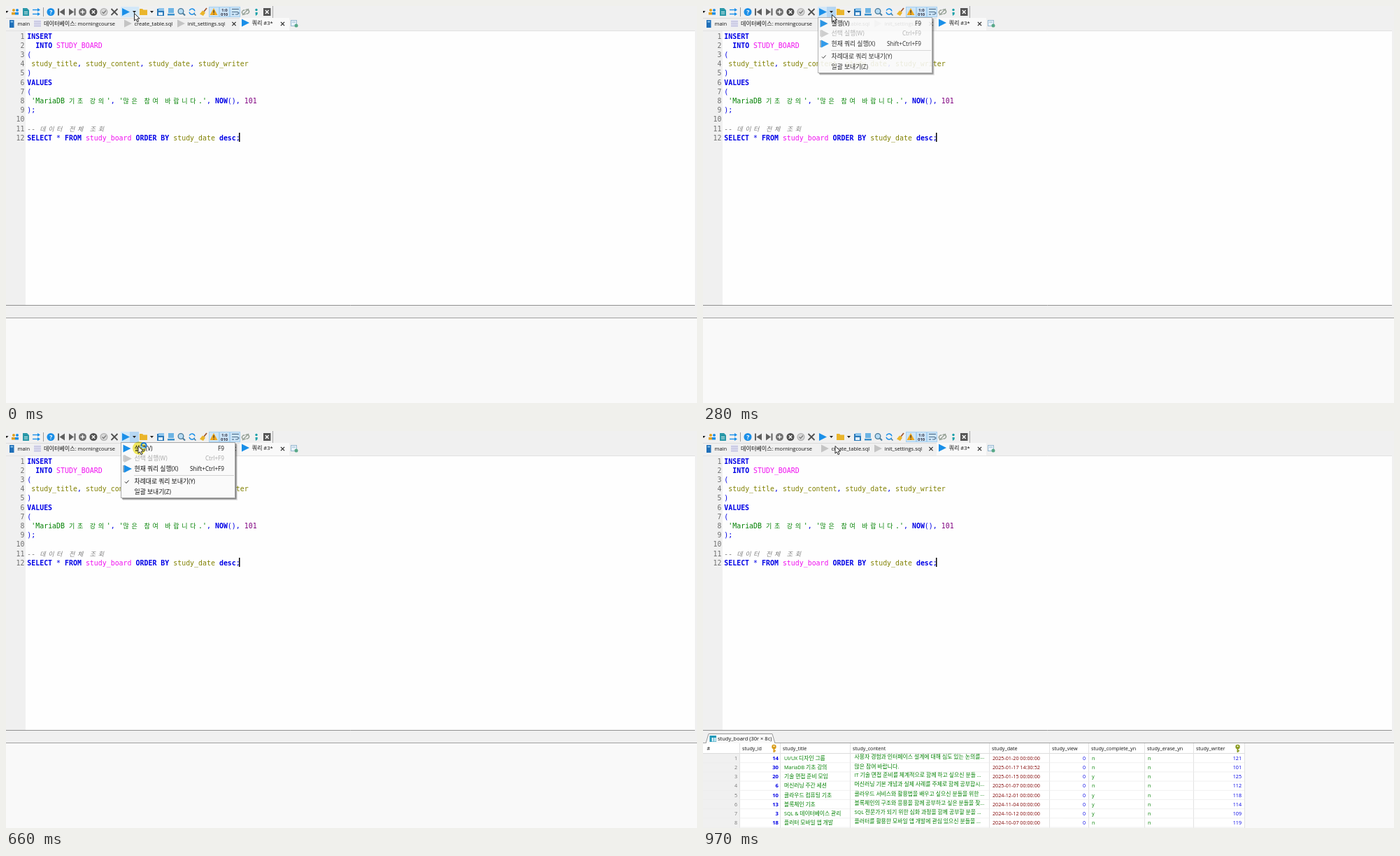
Recreate the animation shown at these times as an HTML page with a canvas. Size 988x567 px, loop 1180 ms.

```html
<!DOCTYPE html>
<html lang="ko">
<head>
<meta charset="utf-8">
<title>SQL editor</title>
<style>
html, body { margin: 0; width: 100%; height: 100%; overflow: hidden; background: #f9f9f9; }
canvas { display: block; }
</style>
</head>
<body>
<canvas id="stage" width="988" height="567"></canvas>
<script>
const W = 988, H = 567, LOOP = 1180;
const screen2d = document.getElementById('stage').getContext('2d');
const buffer = document.createElement('canvas');
buffer.width = W;
buffer.height = H;
const buffer2d = buffer.getContext('2d');
let ctx = screen2d;

const BLUE = '#1a8fe8', DARK = '#606060', GREEN = '#008000', NAVY = '#0000e6';
const UI = '"Open Sans","Noto Sans CJK KR","Noto Sans CJK",sans-serif';
const MONO = '"DejaVu Sans Mono","Noto Sans CJK KR","Noto Sans CJK",monospace';

// Drawing helpers
function rect(x, y, w, h, color) {
  ctx.fillStyle = color;
  ctx.fillRect(x, y, w, h);
}
function frame(x, y, w, h, color) {
  ctx.strokeStyle = color;
  ctx.lineWidth = 1;
  ctx.strokeRect(x + .5, y + .5, w - 1, h - 1);
}
function trace(p) {
  ctx.beginPath();
  for (let i = 0; i < p.length; i += 2) ctx.lineTo(p[i], p[i + 1]);
}
function poly(p, color) {
  trace(p);
  ctx.closePath();
  ctx.fillStyle = color;
  ctx.fill();
}
function line(p, color, width = 1) {
  trace(p);
  ctx.strokeStyle = color;
  ctx.lineWidth = width;
  ctx.stroke();
}
function disc(x, y, r, color) {
  ctx.beginPath();
  ctx.arc(x, y, r, 0, 7);
  ctx.fillStyle = color;
  ctx.fill();
}
function ring(x, y, r, color, width = 1, from = 0, to = 6.3) {
  ctx.beginPath();
  ctx.arc(x, y, r, from, to);
  ctx.strokeStyle = color;
  ctx.lineWidth = width;
  ctx.stroke();
}
function cross(x, y, r, color, width) {
  line([x - r, y - r, x + r, y + r], color, width);
  line([x - r, y + r, x + r, y - r], color, width);
}
const play = (x, y, color) => poly([x - 5, y - 5.5, x + 6, y, x - 5, y + 5.5], color);
const drop = (x, y) => poly([x - 2.5, y - 1, x + 2.5, y - 1, x, y + 2], '#222');

// Hangul is set slightly larger than Latin
function text(s, x, y, color, size = 7.5, right = false, style = '') {
  const parts = s.match(/[가-힣]+|[^가-힣]+/g).map(p => {
    const font = `${style} ${/[가-힣]/.test(p) ? size * 1.08 : size}px ${UI}`;
    ctx.font = font;
    return { p, font, w: ctx.measureText(p).width };
  });
  if (right) x -= parts.reduce((sum, q) => sum + q.w, 0);
  ctx.fillStyle = color;
  for (const q of parts) {
    ctx.font = q.font;
    ctx.fillText(q.p, x, y);
    x += q.w;
  }
}

// Draws a group off screen, then blends it as one
function fade(alpha, draw) {
  ctx = buffer2d;
  ctx.clearRect(0, 0, W, H);
  draw();
  ctx = screen2d;
  ctx.globalAlpha = alpha;
  ctx.drawImage(buffer, 0, 0);
  ctx.globalAlpha = 1;
}

function toolbar(t) {
  rect(0, 0, W, 35, '#f0f0f0');
  line([0, 17.5, 381, 17.5], '#dcdcdc');
  line([381.5, 0, 381.5, 17], '#a8a8a8');
  line([53.5, 2, 53.5, 15], '#999');
  drop(1, 8);

  disc(11, 6, 2, '#e0a020');
  disc(16, 6, 2, BLUE);
  rect(8, 9, 5, 3.5, '#e0a020');
  rect(13, 9, 5, 3.5, BLUE);

  poly([24, 3, 30, 3, 33, 6, 33, 14, 24, 14], '#2a98a8');
  rect(26, 8, 5, 1, '#d8f0f0');
  rect(26, 10.5, 5, 1, '#d8f0f0');

  for (const y of [5.5, 11.5]) line([38, y, 46, y], BLUE, 1.4);
  poly([45, 3, 49, 5.5, 45, 8], BLUE);
  poly([45, 9, 49, 11.5, 45, 14], BLUE);

  disc(64, 8.5, 5.5, BLUE);
  text('?', 62.2, 11.7, '#fff', 8.5, false, 'bold');

  rect(74, 3.5, 2, 10, DARK);
  poly([84, 3.5, 84, 13.5, 76.5, 8.5], DARK);
  rect(97.5, 3.5, 2, 10, DARK);
  poly([90, 3.5, 90, 13.5, 97, 8.5], DARK);

  disc(109.5, 8.5, 5.5, '#707070');
  line([106.5, 8.5, 112.5, 8.5], '#fff', 1.4);
  line([109.5, 5.5, 109.5, 11.5], '#fff', 1.4);
  disc(125, 8.5, 5.5, '#505050');
  cross(125, 8.5, 2.2, '#fff', 1.3);
  disc(140, 8.5, 5.5, '#b0b0b0');
  disc(140, 8.5, 4.3, '#d8d8d8');
  line([137.5, 8.5, 139.5, 10.5, 143, 6.5], '#777', 1.2);
  cross(155, 8.5, 4.5, '#505050', 1.8);

  if (t < 700) {
    rect(164, 1, 26, 15, '#d3e8f8');
    if (t >= 95) rect(177, 1, 13, 15, '#b5d6f2');
  }
  play(171, 8.5, BLUE);
  drop(183.5, 8);

  poly([191, 4, 195, 4, 196.5, 5.5, 202, 5.5, 202, 13, 191, 13], '#eab52c');
  drop(208.5, 8);

  rect(216, 4, 10, 10, '#2a78b8');
  rect(218, 3, 8, 4, '#8cc4ec');
  rect(218, 9, 6, 4, '#e4f2fc');
  rect(232, 3, 8, 7, '#6cb4e4');
  rect(231, 11, 10, 2.5, '#3a90cc');

  disc(250, 7.5, 3.6, '#b8dcf4');
  ring(250, 7.5, 3.8, '#467898', 1.3);
  line([253, 10.5, 256, 13.5], '#467898', 2);
  ring(266, 8, 4, BLUE, 1.5, .4, 3);
  ring(266, 8, 4, BLUE, 1.5, 3.5, 6.1);
  line([269, 11, 271.5, 13.5], '#467898', 1.5);

  line([287, 3, 283, 8], '#a05830', 1.8);
  poly([281, 6.5, 285, 9.5, 282, 14, 277, 11.5], '#eab52c');

  for (const x of [290, 305, 320]) {
    rect(x, 1, 15, 15, '#cce4f7');
    frame(x, 1, 15, 15, '#a6d0f0');
  }
  poly([297, 3, 302.5, 13, 291.5, 13], '#f0a81c');
  rect(296.5, 6, 1.2, 4, '#333');
  rect(296.5, 11, 1.2, 1.2, '#333');
  text('1:0', 308, 7.8, '#334', 6, false, 'bold');
  text('010', 307, 14.2, '#334', 6, false, 'bold');

  line([323, 4.5, 333, 4.5], '#50708c', 1.2);
  line([323, 8.5, 331, 8.5, 333, 10, 331, 12, 328, 12], '#50708c', 1.2);
  line([323, 12, 326, 12], '#50708c', 1.2);

  ring(340.5, 9, 3, '#909c90', 1.3, .8, 5);
  ring(344.5, 8, 3, '#909c90', 1.3, 4, 8.2);
  line([338, 13, 347, 4], '#909c90', 1.2);

  disc(358, 5.5, 1.7, '#18a0a8');
  poly([356.5, 9, 359.8, 9, 359.5, 12, 357, 14], '#18a0a8');
  rect(368, 3, 10.5, 11, '#555');
  cross(373.2, 8.5, 2.4, '#fff', 1.4);
}

function tabs() {
  rect(334, 17, 71, 18, '#f9f9f9');
  rect(5, 20, 6.5, 11, '#1f6fb8');
  rect(6.5, 21.5, 3.5, 2, '#8cc4ec');
  text('main', 16.5, 28.3, '#111');
  rect(40, 20, 10, 10, '#dcdcf0');
  for (const y of [22.5, 25.5, 28.5]) line([40, y, 50, y], '#b8b8d4', .8);
  text('데이터베이스: morningcourse', 54, 28.3, '#111');
  play(174, 25, '#c4c4c4');
  text('create_table.sql', 183.5, 28.3, '#111');
  play(250, 25, '#c4c4c4');
  text('init_settings.sql', 259.5, 28.3, '#111');
  cross(326, 25.5, 2.6, '#222', 1.1);
  play(342, 24, BLUE);
  text('쿼리 #3*', 351.5, 27.2, '#111');
  cross(395.5, 25.5, 2.6, '#222', 1.1);
  rect(407.5, 20, 8, 9, '#e8f2fa');
  frame(407, 20, 9, 9, '#98b8d0');
  line([409, 23, 414, 23], '#98b8d0');
  disc(415, 28, 2.5, '#58a888');
}

const SQL = `INSERT
  INTO STUDY_BOARD
(
 study_title, study_content, study_date, study_writer
)
VALUES
(
 'MariaDB 기초 강의', '많은 참여 바랍니다.', NOW(), 101
);

-- 데이터 전체 조회
SELECT * FROM study_board ORDER BY study_date desc;`.split('\n');
const CELL = 5.97, ROW = 13.2;
const TOKEN = /--.*|'[^']*'|\w+|\s+|[^\w\s]/g;

function look(token) {
  if (/^--/.test(token)) return ['#808080', 'italic'];
  if (/^'/.test(token)) return [GREEN, ''];
  if (/^\d/.test(token)) return ['#800080', ''];
  if (/^study_board$/i.test(token)) return ['#f010f0', ''];
  if (/^study_/.test(token)) return ['#808000', ''];
  if (/^\w/.test(token)) return [NAVY, 'bold'];
  return [NAVY, ''];
}

function code(s, x, y) {
  for (const token of s.match(TOKEN) || []) {
    const [color, style] = look(token);
    ctx.fillStyle = color;
    for (const p of token.match(/[가-힣]|[^가-힣]+/g)) {
      const wide = /[가-힣]/.test(p);
      ctx.font = `${style} ${wide ? 9 : 9.92}px ${MONO}`;
      ctx.fillText(p, x, y);
      x += (wide ? 2 : p.length) * CELL;
    }
  }
}

function editor() {
  rect(0, 35, W, 393, '#f0f0f0');
  rect(28, 36, 957, 391, '#fefefe');
  line([0, 35.5, 985, 35.5], '#e2e2e2');
  line([0, 427.5, 985, 427.5], '#909090');
  SQL.forEach((s, i) => {
    const y = 46.6 + i * ROW;
    ctx.font = `9.92px ${MONO}`;
    ctx.fillStyle = '#707070';
    ctx.textAlign = 'right';
    ctx.fillText(i + 1, 26.5, y);
    ctx.textAlign = 'left';
    code(s, 30.3, y);
  });
  rect(333, 181, 1.5, 13, '#000');
}

const EDGES = [52, 110, 210, 409, 495, 551, 631, 701, 774];
const HEADS = ['study_id', 'study_title', 'study_content', 'study_date', 'study_view',
  'study_complete_yn', 'study_erase_yn', 'study_writer'];
const DATA = [
  [14, 'UI/UX 디자인 그룹', '사용자 경험과 인터페이스 설계에 대해 심도 있는 논의를...', '2025-01-20 00:00:00', 'n', 121],
  [30, 'MariaDB 기초 강의', '많은 참여 바랍니다.', '2025-01-17 14:30:52', 'n', 101],
  [20, '기술 면접 준비 모임', 'IT 기술 면접 준비를 체계적으로 함께 하고 싶으신 분들 ...', '2025-01-15 00:00:00', 'y', 125],
  [6, '머신러닝 주간 세션', '머신러닝 기본 개념과 실제 사례를 주제로 함께 공부합시...', '2025-01-07 00:00:00', 'n', 112],
  [10, '클라우드 컴퓨팅 기초', '클라우드 서비스와 활용법을 배우고 싶으신 분들을 위한 ...', '2024-12-01 00:00:00', 'y', 118],
  [13, '블록체인 기초', '블록체인의 구조와 응용을 함께 공부하고 싶은 분들을 찾...', '2024-11-04 00:00:00', 'y', 114],
  [3, 'SQL & 데이터베이스 관리', 'SQL 전문가가 되기 위한 심화 과정을 함께 공부할 분을 ...', '2024-10-12 00:00:00', 'y', 109],
  [18, '플러터 모바일 앱 개발', '플러터를 활용한 모바일 앱 개발에 관심 있으신 분들을 ...', '2024-10-07 00:00:00', 'n', 119]
];

function key(x, color) {
  disc(x, 451, 3.2, color);
  rect(x - 1, 453, 2, 6, color);
  rect(x, 456, 2.5, 1.5, color);
  disc(x, 450.3, 1, '#fff');
}

function results() {
  poly([4, 446, 8, 432.5, 99, 432.5, 103, 446], '#f9f9f9');
  line([4, 446, 8, 432.5, 99, 432.5, 103, 446], '#999');
  rect(9.5, 435, 9.5, 9, '#2098b8');
  rect(12.5, 438, 6, 5.5, '#d8f0f8');
  line([15.5, 438, 15.5, 443.5], '#2098b8', .8);
  text('study_board (30r × 8c)', 21, 442.2, '#111');

  rect(0, 446, 774, 121, '#fff');
  rect(0, 460, 52, 107, '#f0f0f0');
  line([0, 460.5, 774, 460.5], '#dcdcdc');
  for (const x of EDGES) line([x + .5, 446, x + .5, H], '#e2e2e2');
  text('#', 5.5, 456, '#111', 7.2);
  HEADS.forEach((s, i) => text(s, EDGES[i] + 4, 456, '#111', 7.2));
  key(101.5, '#d89c18');
  key(764.5, '#8a9a20');

  DATA.forEach(([id, title, content, date, done, writer], i) => {
    const y = 469.7 + i * ROW;
    line([0, y + 4, 774, y + 4], '#ececec', .8);
    text(`${i + 1}`, 49, y, '#777', 7.2, true);
    text(`${id}`, 108, y, NAVY, 7.7, true, 'bold');
    text(title, 116, y, GREEN, 7.2);
    text(content, 216.5, y - (i === 1 ? .5 : 2), GREEN, 7.3);
    text(date, 414, y, '#800000', 7.2);
    text('0', 547, y, NAVY, 7.2, true);
    text(done, 556, y, GREEN, 7.2);
    text('n', 636, y, GREEN, 7.2);
    text(`${writer}`, 770, y, NAVY, 7.2, true);
  });
}

function runItem(lit) {
  if (lit) rect(166, 18, 160, 14, '#91c9f7');
  play(172.5, 25, BLUE);
  text('실행(V)', 183.5, 28, '#111', 8.2);
  text('F9', 312, 28, '#111', 8.2, true);
}

function menu(lit) {
  rect(167, 19, 164, 80, 'rgba(0,0,0,.12)');
  rect(166, 18, 163.5, 79.5, 'rgba(0,0,0,.4)');
  rect(164, 16, 164, 80, '#fafafa');
  frame(164, 16, 164, 80, '#a8a8a8');
  runItem(lit);
  rect(167, 34.5, 4, 9, '#d4d4d4');
  play(174, 39.5, '#c8c8c8');
  text('선택 실행(W)', 183.5, 42.4, '#a8a8a8', 8.2);
  text('Ctrl+F9', 312, 42.4, '#a8a8a8', 8.2, true);
  rect(167, 49, 3.5, 10, '#9cb0c0');
  play(174, 54, BLUE);
  text('현재 쿼리 실행(X)', 183.5, 57, '#111', 8.2);
  text('Shift+Ctrl+F9', 312, 57, '#111', 8.2, true);
  line([183, 63.5, 326, 63.5], '#d4d4d4');
  line([170, 72.5, 172, 74.5, 175.5, 70.5], '#222');
  text('차례대로 쿼리 보내기(Y)', 183.5, 75.3, '#111', 8.2);
  text('일괄 보내기(Z)', 183.5, 90, '#111', 8.2);
}

function glow(x, y, r) {
  ctx.globalCompositeOperation = 'multiply';
  disc(x, y, r, '#f5ec62');
  ctx.globalCompositeOperation = 'source-over';
}

function pointer(x, y) {
  const shape = [0, 0, 0, 10.5, 2.4, 8.3, 4.2, 12.2, 6, 11.4, 4.3, 7.6, 7.5, 7.4];
  ctx.save();
  ctx.translate(x, y);
  poly(shape, '#fff');
  ctx.closePath();
  line([...shape, 0, 0], '#111', .9);
  ctx.restore();
}

const clamp = v => Math.min(1, Math.max(0, v));
const smooth = v => v * v * (3 - 2 * v);

function render(t) {
  const move = smooth(clamp((t - 230) / 200));
  const x = 183.5 + 5.5 * move, y = 10.5 + 11 * move;
  const shown = clamp((t - 95) / 210);

  rect(0, 0, W, H, '#f9f9f9');
  toolbar(t);
  tabs();
  editor();
  rect(0, 428, W, 18, '#f0f0f0');
  line([0, 445.5, W, 445.5], '#a0a0a0');
  if (t >= 730) results();

  if (t >= 60 && t < 260) glow(183.5, 9, 7);
  if (t < 700) {
    if (shown) fade(shown, () => menu(t >= 350 && t < 640));
  } else {
    const ghost = 1 - clamp((t - 700) / 160);
    if (ghost) fade(ghost, () => runItem(true));
  }
  if (t >= 580 && t < 690) glow(190.5, 24.5, 9.5);
  if (t >= 620 && t < 720) {
    ring(197, 20.5, 3.6, '#1878d0', 2);
    ring(197, 20.5, 3.6, '#8cd0f8', 2, t / 90, t / 90 + 1.8);
  }
  pointer(x, y);
}

const start = performance.now();
function tick() {
  render((performance.now() - start) % LOOP);
  requestAnimationFrame(tick);
}
tick();
</script>
</body>
</html>
```
